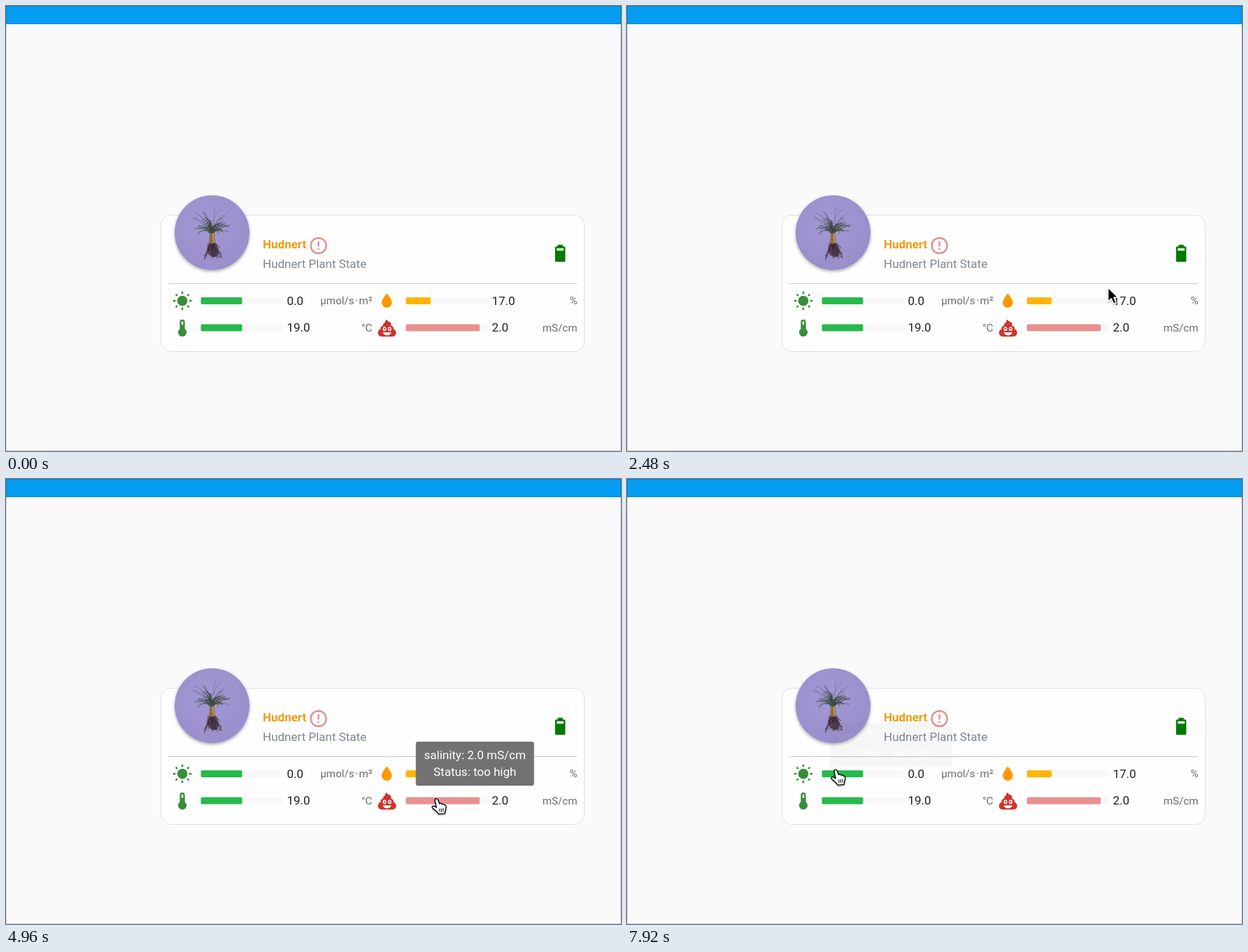
An HTML page for the animation above (8 s loop, 879 by 637 pixels).

```html
<!DOCTYPE html>
<html lang="en">
<head>
<meta charset="utf-8">
<title>Plant card</title>
<style>
  html, body { margin: 0; width: 100%; height: 100%; overflow: hidden; background: #fafafa; }
  svg { display: block; width: 100%; height: 100%; font-family: Roboto, sans-serif; }
  .value { font-size: 17px; fill: #212121; }
  .unit { font-size: 15.2px; fill: #6b6b6b; text-anchor: end; }
  .tip text { font-size: 17px; fill: #fff; text-anchor: middle; }
  .ok { fill: #388e3c; }
</style>
</head>
<body>
<svg viewBox="0 0 879 637">
  <defs>
    <radialGradient id="wall" cx=".45" cy=".4" r=".65">
      <stop offset="0" stop-color="#a399d5"/>
      <stop offset="1" stop-color="#998dca"/>
    </radialGradient>
    <filter id="soft" x="-20%" y="-20%" width="140%" height="150%">
      <feDropShadow dx="0" dy="2" stdDeviation="2" flood-opacity=".32"/>
    </filter>
    <filter id="drop" x="-40%" y="-40%" width="180%" height="190%">
      <feDropShadow dx="0" dy="1.5" stdDeviation="1.2" flood-opacity=".35"/>
    </filter>
  </defs>

  <rect width="879" height="637" fill="#fafafa"/>
  <rect width="879" height="26" fill="#059df2"/>
  <path d="M0 25.5H879" stroke="#000" stroke-opacity=".15"/>
  <rect x=".5" y=".5" width="878" height="636" fill="none" stroke="#000" stroke-opacity=".17"/>

  <rect x="221.5" y="299.5" width="605" height="195" rx="14" fill="#fefefe" stroke="#e0e0e0"/>
  <circle cx="294.5" cy="324.5" r="53.5" fill="url(#wall)" filter="url(#soft)"/>
  <g id="plant" fill="none" stroke-linecap="round"></g>

  <text x="367" y="347" font-size="17" font-weight="700" fill="#f39c12">Hudnert</text>
  <text x="367" y="374.6" font-size="17" fill="#7f8593">Hudnert Plant State</text>
  <g fill="none" stroke="#e09191" stroke-width="2.4">
    <circle cx="446.6" cy="343" r="11"/>
    <path d="M446.6 336.9v7.3M446.6 346.7v2.4"/>
  </g>
  <path transform="translate(777.4 339.4) scale(1.22)" fill="#007a00" fill-rule="evenodd"
    d="M16 8.8H8V6H16ZM16.7 4H15V2H9V4H7.3A1.3 1.3 0 0 0 6 5.3V20.7A1.3 1.3 0 0 0 7.3 22H16.7A1.3 1.3 0 0 0 18 20.7V5.3A1.3 1.3 0 0 0 16.7 4Z"/>
  <path d="M232 397.5H816" stroke="#c6c8c8"/>

  <g id="sun" class="ok" transform="translate(252 422)"><circle r="7.3"/></g>
  <path class="ok" transform="translate(237.4 446.4) scale(1.22)" fill-rule="evenodd"
    d="M15 13V5A3 3 0 0 0 9 5V13A5 5 0 1 0 15 13ZM12 4A1 1 0 0 1 13 5V8H11V5A1 1 0 0 1 12 4Z"/>
  <path transform="translate(529.6 407.5) scale(1.22)" fill="#ff9800"
    d="M12 20A6 6 0 0 1 6 14C6 10 12 3.25 12 3.25S18 10 18 14A6 6 0 0 1 12 20Z"/>
  <g transform="translate(530 446.4) scale(1.22)">
    <path fill="#d0342c" d="M11.5 2C9.5 3 10.5 4.5 9 5.8C7.6 6.8 7 7.8 7.2 9C5.2 9.4 4 11 4.4 13.2C2.4 13.8 1.4 15.5 1.4 17.6C1.4 20.2 3 22 5.5 22H18.5C21 22 22.6 20.2 22.6 17.6C22.6 15.5 21.6 13.8 19.6 13.2C20 11 18.8 9.4 16.6 9C17.4 6.6 16 4.8 14 4.4C12.6 4 11.9 3.2 11.5 2Z"/>
    <g fill="#fff">
      <ellipse cx="9" cy="13" rx="2" ry="2.5"/>
      <ellipse cx="15" cy="13" rx="2" ry="2.5"/>
      <path d="M7 17H17C16.4 19.2 14.5 20.4 12 20.4S7.6 19.2 7 17Z"/>
    </g>
    <g fill="#d0342c"><circle cx="9" cy="13" r=".95"/><circle cx="15" cy="13" r=".95"/></g>
  </g>
  <g id="meters"></g>
  <g id="tips"></g>

  <g id="arrow" filter="url(#drop)">
    <path d="M0 0V20L4.6 15.7L8 23.3L11.6 21.7L8.4 14.3H14.3Z" stroke="#fff" stroke-width="1.5" stroke-linejoin="round"/>
  </g>
  <g id="hand" filter="url(#drop)" stroke="#000" stroke-width="1.35" stroke-linejoin="round" stroke-linecap="round">
    <path fill="#fff" d="M-3 1.3C-3.3 -1 .2 -1.7 1.3 .6L3.6 6.4C4.7 5.2 6.6 5.5 7.2 7.2C8.3 6.2 10 6.7 10.5 8.3C11.8 7.8 12.8 8.8 12.9 10.3C13 13.8 11.7 16.4 11.2 20.3L2.4 21.2C1 18 -3.6 15.4 -6.4 12.2C-7.6 10.6 -5.6 8.7 -3.8 9.8L-.8 11.6Z"/>
    <path fill="none" stroke-width="1" d="M3.5 13.8L4.3 17.8M6 13.4L6.7 17.5M8.6 13L9.1 17.1"/>
  </g>
</svg>
<script>
const NS = 'http://www.w3.org/2000/svg';
const $ = id => document.getElementById(id);

function add(parent, tag, attrs, text) {
  const el = document.createElementNS(NS, tag);
  for (const k in attrs) el.setAttribute(k, attrs[k]);
  if (text) el.textContent = text;
  parent.appendChild(el);
  return el;
}

let seed = 11;
function rand(a, b) {
  seed = (seed * 16807) % 2147483647;
  return a + (b - a) * seed / 2147483647;
}

// Sun rays
for (let i = 0; i < 8; i++) {
  add($('sun'), 'rect', { x: -1.2, y: -13.3, width: 2.4, height: i % 2 ? 3.1 : 3.6, transform: `rotate(${i * 45})` });
}

// Plant: roots, trunk, leaf tuft, loose wisps
const plant = $('plant');
add(plant, 'path', { d: 'M291 339Q285 346 289 354Q293 361 301 359Q307 351 300 339Z', fill: '#3a2b38', 'fill-opacity': .75 });
for (let i = 0; i < 26; i++) {
  add(plant, 'path', {
    d: `M${rand(290, 299)} 339Q${rand(282, 308)} ${rand(341, 352)} ${rand(283, 308)} ${rand(346, 364)}`,
    stroke: i % 3 ? '#30222f' : '#6b4a55', 'stroke-width': .7
  });
}
add(plant, 'path', { d: 'M291.5 322L290 339Q294 342 299 339L297.5 322Z', fill: '#8d6f49' });
add(plant, 'path', { d: 'M295.8 326L297 338', stroke: '#c7a068', 'stroke-width': 1.6 });

function leaf(spread, min, max, width, opacity) {
  const a = rand(-spread, spread), len = rand(min, max);
  const x = 294 + Math.sin(a) * len, y = 320 - Math.cos(a) * len * .8;
  const ex = x + Math.sign(a) * rand(0, 6), ey = y + Math.abs(a) * rand(1, 8);
  add(plant, 'path', {
    d: `M${rand(290, 298)} ${rand(318, 326)}Q${x} ${y} ${ex} ${ey}`,
    stroke: len % 2 > 1 ? '#2e3b33' : '#475443', 'stroke-width': width, 'stroke-opacity': opacity
  });
}
for (let i = 0; i < 44; i++) leaf(1.55, 8, 25, rand(.5, 1.1), .8);
for (let i = 0; i < 14; i++) leaf(1.2, 28, 40, .5, .55);

// Gives the middle dot a little air
function spaced(el, text) {
  const [a, b] = text.split('·');
  add(el, 'tspan', {}, a);
  if (b) {
    add(el, 'tspan', { dx: 1.5 }, '·');
    add(el, 'tspan', { dx: 1.5 }, b);
  }
}

// x, y, fill width, colour, value, unit
const METERS = [
  [278.5, 422, 59, '#28b94c', '0.0', 'µmol/s·m²'],
  [278.5, 460.6, 59, '#28b94c', '19.0', '°C'],
  [571.5, 422, 35.5, '#ffb507', '17.0', '%'],
  [571.5, 460.6, 105.5, '#e99191', '2.0', 'mS/cm']
];
for (const [x, y, w, fill, value, unit] of METERS) {
  const g = $('meters'), bar = { x, y: y - 5, height: 10, rx: 2 };
  add(g, 'rect', { ...bar, width: 117, fill: '#f8f8f8' });
  add(g, 'rect', { ...bar, width: w, fill });
  add(g, 'text', { class: 'value', x: x + 123, y: y + 5.5 }, value);
  spaced(add(g, 'text', { class: 'unit', x: x + 245, y: y + 5 }), unit);
}

// centre x, top, width, two lines, [from, to] times
const TIPS = [
  [792.2, 247.5, 153.5, 'Battery: 71%', 'Status: Very High', [[480, 2080]]],
  [670.2, 337.3, 148.5, 'moisture: 17.0 %', 'Status: low', [[2520, 3960]]],
  [670.2, 376, 169, 'salinity: 2.0 mS/cm', 'Status: too high', [[3960, 5600]]],
  [377.6, 337.3, 175.5, 'light: 0.0 µmol/s·m²', 'Status: perfect', [[5850, 6465], [7905, 8000]]],
  [377.6, 376, 179, 'temperature: 19.0 °C', 'Status: perfect', [[6465, 7905]]]
].map(([cx, top, w, a, b, spans]) => {
  const el = add($('tips'), 'g', { class: 'tip' });
  add(el, 'rect', { x: cx - w / 2, y: top, width: w, height: 63, rx: 3, fill: '#727272' });
  spaced(add(el, 'text', { x: cx, y: top + 24.7 }), a);
  add(el, 'text', { x: cx, y: top + 49 }, b);
  return { el, spans };
});

// time, x, y of the pointer
const PATH = [
  [240, 822, 392], [480, 794, 356], [960, 792, 350], [1360, 796, 347], [1760, 788, 345],
  [2000, 788, 345], [2320, 735, 386], [2640, 640, 420], [3040, 600, 422], [3280, 597, 420.5],
  [3680, 597, 420.5], [4240, 616, 458.5], [5360, 616, 458.5], [5680, 535, 448], [6080, 403, 428.5],
  [6240, 372, 429], [6480, 318, 442], [6720, 303.5, 452], [7120, 301, 456], [7600, 300, 452],
  [7840, 299, 432], [7920, 299, 417], [8000, 299, 417]
];
const LOOP = 8000, STEP = 80, FADE = 300, SLIDE = 12.5;

function pointer(t) {
  const i = PATH.findIndex(p => p[0] > t);
  const [t0, x0, y0] = PATH[i - 1], [t1, x1, y1] = PATH[i];
  const k = (t - t0) / (t1 - t0);
  return [x0 + (x1 - x0) * k, y0 + (y1 - y0) * k];
}

function draw(now) {
  const t = Math.floor(now % LOOP / STEP) * STEP;
  for (const { el, spans } of TIPS) {
    const span = spans.find(([a, b]) => t >= a && t < b);
    const k = span ? Math.min(1, (t - span[0]) / FADE) : 0;
    el.setAttribute('opacity', k);
    el.setAttribute('transform', `translate(0 ${SLIDE * (1 - k)})`);
  }
  const shown = t >= PATH[0][0];
  const [x, y] = shown ? pointer(t) : [0, 0];
  const overCell = y > 403 && x < 816;
  for (const [id, on] of [['hand', shown && overCell], ['arrow', shown && !overCell]]) {
    $(id).setAttribute('visibility', on ? 'visible' : 'hidden');
    $(id).setAttribute('transform', `translate(${x} ${y})`);
  }
}

const start = performance.now();
function tick() {
  draw(performance.now() - start);
  requestAnimationFrame(tick);
}
tick();
</script>
</body>
</html>
```
